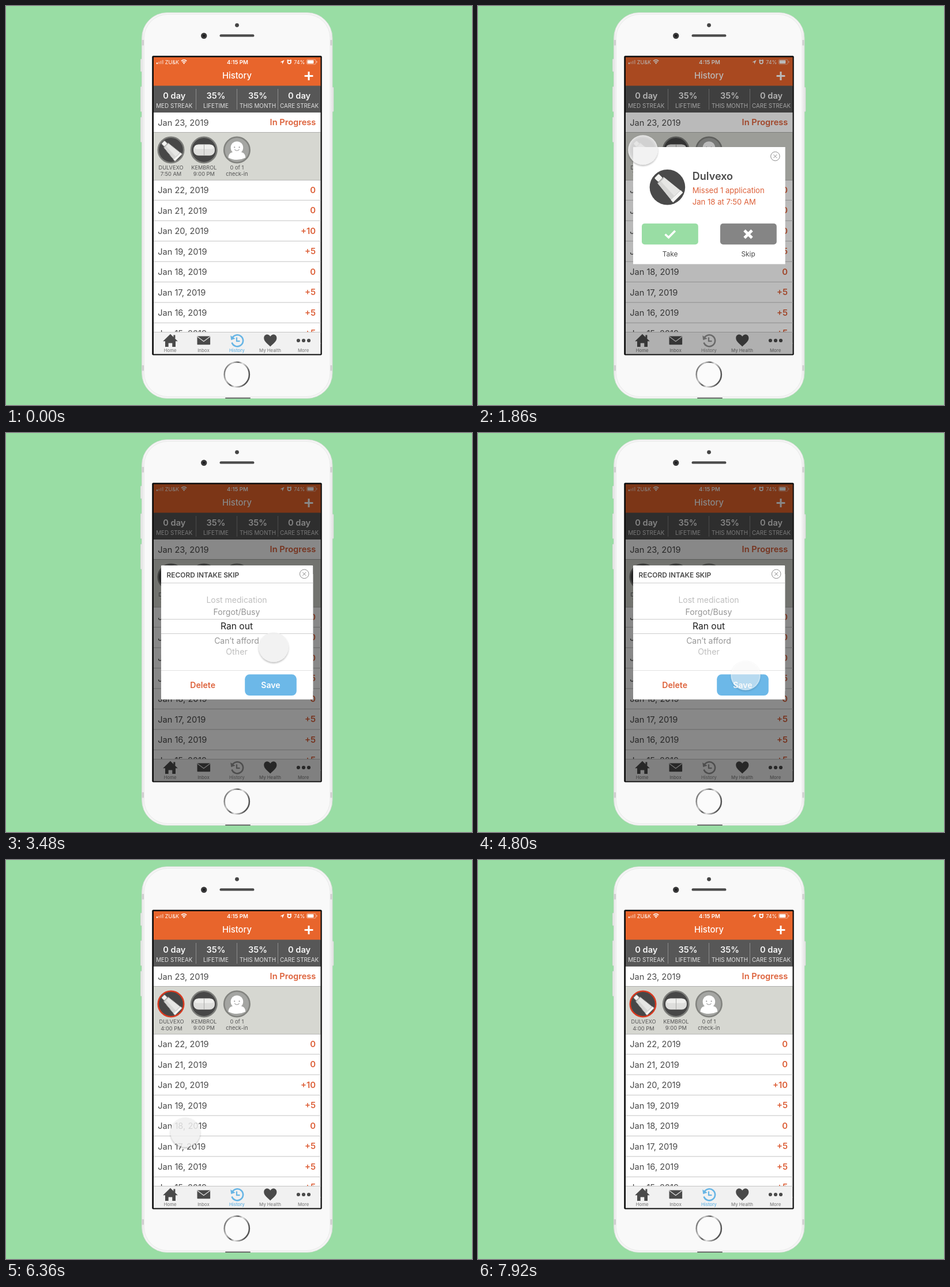
Recreate the animation shown at these times as an HTML page. Size 808 by 693 pixels, loop 7980 ms.

```html
<!DOCTYPE html>
<html lang="en">
<head>
<meta charset="utf-8">
<title>Medication history</title>
<style>
html, body { margin: 0; width: 100%; height: 100%; overflow: hidden; background: #99dda4; }
svg { display: block; width: 808px; height: 693px; }
text { font-family: Inter, Roboto, sans-serif; }
</style>
</head>
<body>
<svg id="stage" viewBox="0 0 808 693"></svg>
<script>
const LOOP = 7980;
const ORANGE = '#e8652c', RUST = '#dd613a', DARK = '#4a4a4a', GREEN = '#99dda4', BLUE = '#67b5e5';

const rect = (x, y, w, h, fill, r = 0, more = '') =>
  `<rect x="${x}" y="${y}" width="${w}" height="${h}" rx="${r}" fill="${fill}" ${more}/>`;
const circle = (x, y, r, fill, more = '') =>
  `<circle cx="${x}" cy="${y}" r="${r}" fill="${fill}" ${more}/>`;
const line = (d, color, width = 1, more = '') =>
  `<path d="${d}" fill="none" stroke="${color}" stroke-width="${width}" ${more}/>`;
const shape = (d, fill) => `<path d="${d}" fill="${fill}"/>`;
const text = (s, x, y, size, fill, weight = 400, anchor = 'middle') =>
  `<text x="${x}" y="${y}" font-size="${size}" fill="${fill}" font-weight="${weight}" text-anchor="${anchor}">${s}</text>`;
const group = (id, body, more = '') => `<g id="${id}" ${more}>${body}</g>`;

function phone() {
  const side = (x, y, w, h) => rect(x, y, w, h, '#ededed', 1.2, 'stroke="#c9cfca" stroke-width=".7"');
  const bands = [59, 624].map(y => [235.5, 561].map(x => rect(x, y, 4.5, 9.5, '#cfcfcf')).join('')).join('');
  return side(233.3, 92, 4, 22) + side(233.3, 140, 4, 43.5) + side(233.3, 193, 4, 43.5) + side(564, 141, 4, 42.5) +
    rect(235.5, 11.5, 330.5, 670, 'url(#rim)', 44, 'stroke="#dcdfdc" stroke-width=".8"') + bands +
    rect(239.5, 14.5, 322.5, 664, '#f9f9f9', 41, 'stroke="#e9e9e9" stroke-width="1"') +
    rect(380, 680, 44, 2, '#6d6d6d', 1) +
    circle(400.5, 33.3, 3.4, '#454545') + circle(343.2, 51.8, 5.2, '#3a3a3a') + circle(343.2, 51.8, 2, '#17171b') +
    rect(370.5, 49.2, 60, 4.4, '#4b4b4b', 2.2) +
    circle(400.3, 640, 21.6, '#fbfbfb', 'stroke="url(#steel)" stroke-width="2.5"') +
    rect(253.3, 86.5, 294.4, 520, '#0b0b0b', 2);
}

function statusBar() {
  const bars = [0, 1, 2, 3].map(i =>
    rect(260.8 + i * 3.3, 98.3 - i * 1.5, 2.2, 2.5 + i * 1.5, '#fff', .5, `opacity="${i ? .4 : 1}"`)).join('');
  const wifi = line('M304 95.6Q308.6 91.4 313.2 95.6M305.7 97.7Q308.6 95.2 311.5 97.7', '#fff', 1.5) +
    shape('M306.9 99Q308.6 97.7 310.3 99L308.6 101Z', '#fff');
  const alarm = circle(491.2, 97.3, 2.8, 'none', 'stroke="#fff" stroke-width="1.7"') +
    line('M487.4 95L489.4 93.2M495 95L493 93.2', '#fff', 1.3);
  return bars + wifi + alarm + text('ZU&amp;K', 275.8, 100.5, 9, '#fff', 400, 'start') +
    text('4:15 PM', 401.5, 100.5, 9.6, '#fff', 600) + text('74%', 508.8, 100.5, 9, '#fff') +
    shape('M475.3 97.4L482.6 93.8L479.3 101.2L478.8 97.8Z', '#fff') +
    rect(521.3, 93, 16, 8.2, 'none', 2.2, 'stroke="#fff" stroke-opacity=".6" stroke-width=".8"') +
    rect(522.6, 94.3, 10.8, 5.6, '#fff', 1) + rect(538.3, 95.7, 1.2, 2.8, '#fff', .6, 'opacity=".6"');
}

function header() {
  const stats = [['0 day', 'MED STREAK', 291.8], ['35%', 'LIFETIME', 364], ['35%', 'THIS MONTH', 436.5], ['0 day', 'CARE STREAK', 508.6]];
  return rect(256, 89, 289.5, 50, ORANGE) + statusBar() +
    text('History', 400.5, 126, 14.8, '#fff', 500) +
    line('M517.6 121.5H532.4M525 114.1V128.9', '#fff', 3) +
    rect(256, 138.5, 289.5, 46.5, '#575757') +
    stats.map(([n, label, x]) => text(n, x, 161, 14.6, '#f6f6f6', 600) + text(label, x, 177, 9.9, '#e2e2e2')).join('') +
    line('M329.5 144V180M400.5 144V180M471.5 144V180', '#8d8d8d');
}

const tube = (x, y, k) => `<g transform="translate(${x} ${y}) rotate(45) scale(${k})">` +
  rect(-19.5, -3.8, 7, 7.6, '#f4f4f2', 1) + rect(-12.4, -5.6, 1.6, 11.2, '#bdbdbb') +
  shape('M-11-5.6L14.5-8.3V8.3L-11 5.6Z', '#e6e6e4') + shape('M-11 1L14.5 2V8.3L-11 5.6Z', '#d6d6d4') +
  rect(14.5, -8.8, 4.2, 17.6, '#f6f6f4', .5) + '</g>';

const disc = (x, fill, ring) => circle(x, 250, 22.2, fill, `stroke="${ring}" stroke-width="2.6"`);
const caption = (x, a, b, y = 295) => text(a, x, 284, 9.2, '#555') + text(b, x, y, 9.3, '#555');

function today() {
  const pill = rect(325, 240.2, 37, 19.6, '#dededc', 9) + rect(327, 241.6, 33, 7, '#efefed', 4) +
    line('M343.5 240.2V259.8', '#aaaaa8', 1);
  const person = circle(400.4, 246, 10.8, '#fff') +
    shape('M385.5 263.4Q386 254.5 394 253.8H407Q414.8 254.5 415.3 263.4Q408 267 400.4 267Q392.500 267 385.5 263.4Z', '#fff') +
    circle(396.2, 245.3, 1.1, '#999') + circle(404.6, 245.3, 1.1, '#999') +
    line('M396.300 249.2Q400.4 253.4 404.5 249.2', '#999', 1.1);
  return rect(256, 185, 289.5, 34.5, '#fff') +
    text('Jan 23, 2019', 263.2, 207.8, 14.6, DARK, 400, 'start') +
    text('In Progress', 537.3, 207.3, 14.6, RUST, 600, 'end') +
    rect(256, 219.5, 289.5, 83, '#d6d7d1') +
    disc(343.2, '#474747', '#7b7c79') + pill + caption(343.4, 'KEMBROL', '9:00 PM') +
    disc(400.4, '#a4a5a2', '#82837f') + person + caption(400.4, '0 of 1', 'check-in') +
    group('pending', disc(286, '#474747', '#7b7c79') + caption(286, 'DULVEXO', '7:50 AM')) +
    group('skipped', disc(286, '#474747', '#d93a20') + caption(287, 'DULVEXO', '4:00 PM', 296), 'opacity="0"') +
    tube(286, 250.3, 1);
}

function history() {
  const scores = ['0', '0', '+10', '+5', '0', '+5', '+5', '+5'];
  return rect(256, 302.500, 289.5, 264, '#fff') + scores.map((s, i) => {
    const y = 325.2 + i * 35.5;
    return text(`Jan ${22 - i}, 2019`, 263.2, y, 14.6, DARK, 400, 'start') +
      text(s, 537, y - .5, 14.8, RUST, 600, 'end') +
      line(`M256 ${y + 12.2}H545.5`, '#cfcfcf', 1.2);
  }).join('');
}

function clockTab(color) {
  return line('M392.300 576.5A10 10 0 1 1 391.6 584.500', color, 2.6) +
    shape('M389.2 572.2L390.2 580.200L397.6 577.8Z', color) +
    line('M400 575.5V582.2H405.5', color, 2.2) + text('History', 400.4, 601, 7.8, color, 500);
}

function tabs() {
  const label = (s, x) => text(s, x, 601, 7.8, '#858585', 500);
  return rect(256, 566, 289.5, 38.5, '#f1f1f1') + line('M256 566.500H545.5', '#c4c4c4') +
    shape('M285 569.8L297.8 582.2H294V592H288.3V585.500H281.7V592H276V582.2H272.200Z', DARK) + rect(290.4, 571.5, 3, 6, DARK) +
    rect(331.5, 573.5, 22.6, 14.8, DARK, .8) + line('M331.8 574.3L342.8 582.5L353.8 574.3', '#e4e4e4', 1.1) +
    shape('M458.3 591.5C453 586.500 447.2 582.5 447.2 576.8C447.2 569.5 455.500 568.500 458.3 574C461.1 568.500 469.4 569.5 469.4 576.8C469.4 582.5 463.6 586.500 458.3 591.5Z', DARK) +
    [507, 516, 525].map(x => circle(x, 581, 3.1, DARK)).join('') +
    label('Home', 284.7) + label('Inbox', 342.5) + label('My Health', 458) + label('More', 515.6) +
    group('tabGray', clockTab('#929292'), 'opacity="0"') + group('tabBlue', clockTab(BLUE));
}

const dim = rect(256, 89, 289.5, 515.5, '#000', 0, 'opacity=".27"');
const close = (x, y) => circle(x, y, 7.8, 'none', 'stroke="#8b8b8b"') +
  line(`M${x - 3} ${y - 3}l6 6m0-6l-6 6`, '#8b8b8b');

function doseDialog() {
  return dim + rect(269, 245, 263.7, 203.3, '#fff') + close(515.4, 261) +
    circle(328.4, 314.8, 30.8, DARK) + tube(328.6, 314.3, 1.38) +
    text('Dulvexo', 371.8, 302.3, 18, DARK, 600, 'start') +
    text('Missed 1 application', 371.8, 324.6, 13.1, RUST, 400, 'start') +
    text('Jan 18 at 7:50 AM', 371.8, 345.4, 13.1, RUST, 400, 'start') +
    rect(284, 377.7, 97.8, 36.5, GREEN, 5) + line('M324.5 396.5L330.500 402L341.800 390.500', '#fff', 3.6) +
    rect(420, 377.7, 97.8, 36.5, '#858585', 5) + line('M462 389.8l13 13m0-13l-13 13', '#fff', 5) +
    text('Take', 333, 434.6, 11.9, DARK) + text('Skip', 468.6, 434.6, 11.9, DARK);
}

function skipDialog() {
  const options = [['Lost medication', 295, 14, '#bebebe'], ['Forgot/Busy', 316, 14.1, '#969696'],
    ['Ran out', 341.2, 15.6, '#1f1f1f'], ['Can’t afford', 365.7, 14, '#969696'], ['Other', 384.800, 14.2, '#bebebe']];
  return dim + rect(269, 230, 263.2, 232.8, '#fff', 1) + close(517.2, 244.8) +
    text('RECORD INTAKE SKIP', 278.6, 250.6, 11.9, DARK, 600, 'start') +
    line('M269 260.500H532.2M269 323.500H532.2M269 348.500H532.2', '#cdcdcd') +
    line('M269 412.500H532.2', '#e2e2e2') +
    options.map(([s, y, size, color]) => text(s, 400, y, size, color)).join('') +
    text('Delete', 341.2, 443, 14.1, RUST, 600) +
    rect(414.2, 419.3, 89.6, 36.8, '#6cb8e8', 8) + text('Save', 458.9, 443, 14, '#fff', 600);
}

const pointer = group('up', circle(0, 0, 25.8, '#f0f0f0', 'opacity=".84" filter="url(#shadow)"')) +
  group('down', circle(0, 0, 24.6, '#fff', 'fill-opacity=".45" stroke="#fff" stroke-width="1.2"'), 'opacity="0"');

document.getElementById('stage').innerHTML = `<defs>
  <linearGradient id="rim"><stop offset="0" stop-color="#e4e4e4"/><stop offset=".012" stop-color="#f5f5f5"/>
    <stop offset=".988" stop-color="#f5f5f5"/><stop offset="1" stop-color="#e4e4e4"/></linearGradient>
  <linearGradient id="steel" x2="1" y2=".35"><stop offset="0" stop-color="#4a4a4a"/><stop offset=".3" stop-color="#c4c4c4"/>
    <stop offset=".5" stop-color="#5a5a5a"/><stop offset=".66" stop-color="#e4e4e4"/><stop offset="1" stop-color="#555"/></linearGradient>
  <filter id="shadow" x="-30%" y="-30%" width="160%" height="170%">
    <feDropShadow dx="0" dy="2" stdDeviation="1.8" flood-opacity=".32"/></filter>
  </defs>` + rect(0, 0, 808, 693, GREEN) + phone() + header() + today() + history() + tabs() +
  group('dialogs', group('dose', doseDialog(), 'opacity="0"') + group('skip', skipDialog(), 'opacity="0"')) +
  group('pointer', pointer);

const OUT = 'cubic-bezier(.33,1,.68,1)', IN = 'cubic-bezier(.32,0,.67,0)', BOTH = 'cubic-bezier(.65,0,.35,1)';

// Steps: [ms, value, easing to the next step]; the last value holds to the loop's end.
function play(id, prop, steps) {
  const keys = steps.map(([ms, value, easing = 'linear']) => ({ offset: ms / LOOP, [prop]: value, easing }));
  keys.push({ offset: 1, [prop]: steps[steps.length - 1][1] });
  document.getElementById(id).animate(keys, { duration: LOOP, iterations: Infinity });
}
const at = (x, y) => `translate(${x}px, ${y}px)`;

play('pointer', 'transform', [
  [0, at(-40, 562)], [180, at(-40, 562), OUT],
  [720, at(286, 250)], [1860, at(286, 250), BOTH],
  [2340, at(462, 389)], [3000, at(462, 389), BOTH],
  [3420, at(464, 372)], [4080, at(464, 372), BOTH],
  [4680, at(464, 421)], [5760, at(464, 421), IN],
  [6720, at(-154, 630)]
]);

// Each press fades in, holds and fades out.
const presses = [[1080, 1200, 1440, 1560], [2400, 2500, 2640, 2760], [4720, 4880, 5280, 5400]];
const pressSteps = (idle, held) => [[0, idle],
  ...presses.flatMap(([a, b, c, d]) => [[a, idle], [b, held], [c, held], [d, idle]])];
play('up', 'opacity', pressSteps(1, 0));
play('down', 'opacity', pressSteps(0, 1));

play('dose', 'opacity', [[0, 0], [1560, 0], [1800, 1], [6060, 1], [6060, 0]]);
play('skip', 'opacity', [[0, 0], [2760, 0], [3000, 1], [6060, 1], [6060, 0]]);
play('dialogs', 'opacity', [[0, 1], [5760, 1], [6000, 0]]);
play('tabBlue', 'opacity', [[0, 1], [1560, 1], [1800, 0], [5760, 0], [6000, 1]]);
play('tabGray', 'opacity', [[0, 0], [1560, 0], [1800, 1], [5760, 1], [6000, 0]]);
play('pending', 'opacity', [[0, 1], [5760, 1], [5760, 0]]);
play('skipped', 'opacity', [[0, 0], [5760, 0], [5760, 1]]);
</script>
</body>
</html>
```
